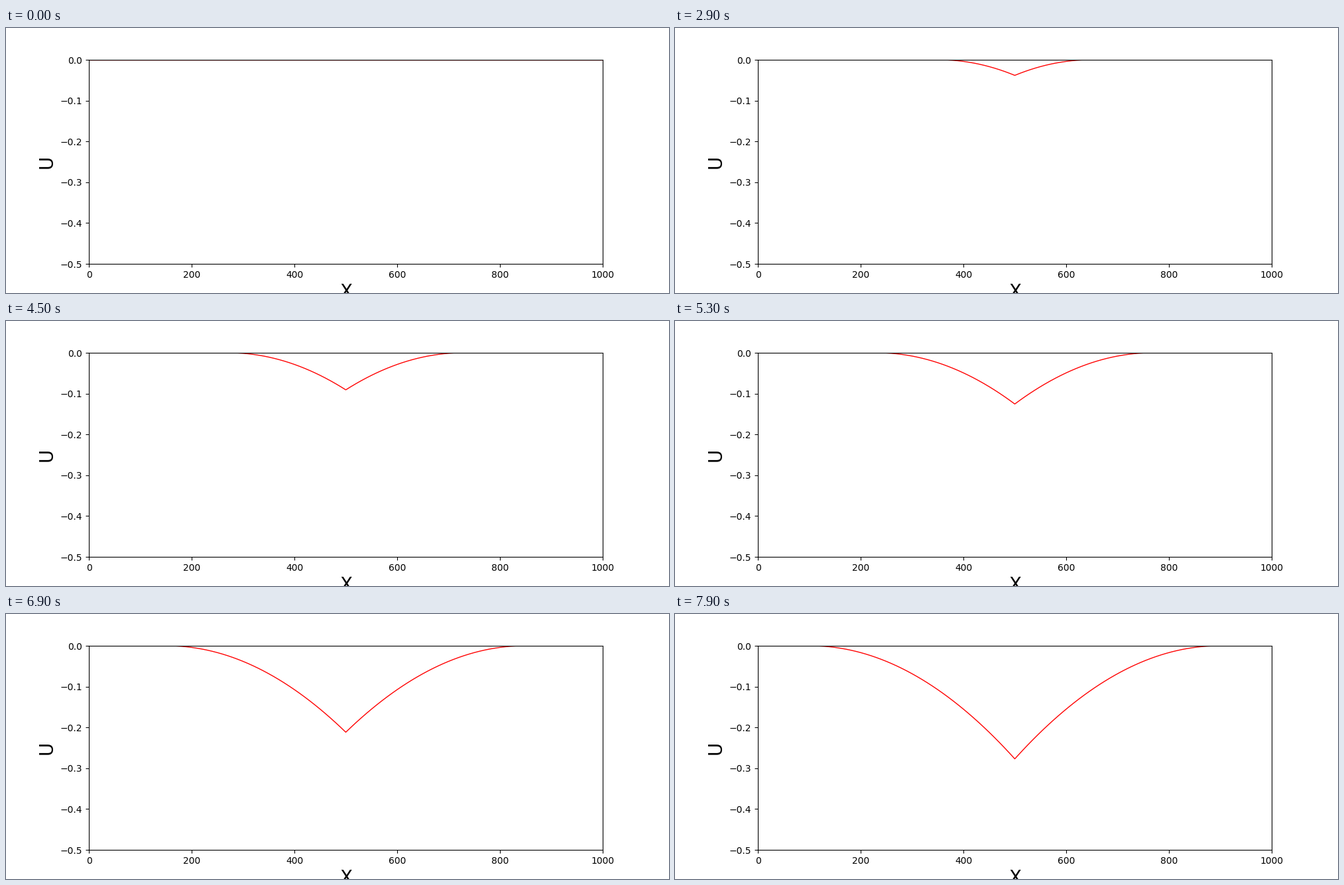
A matplotlib script for the animation above (8000 ms loop, 1000x400 px).

```python
import numpy as np
import matplotlib.pyplot as plt
from matplotlib.animation import FuncAnimation

FRAMES = 80
INTERVAL = 100      # ms
DX = 5              # the wave front advances one cell per step
CENTER = 500
AMP = 4.384e-5

x = np.arange(0, 1000 + DX, DX)
cells = np.abs(x - CENTER) // DX


def displacement(step):
    """String pulled down at its centre by a steadily growing point load."""
    m = np.clip(step - cells, 0, None)
    return -AMP * m * (m + 1)


plt.rcParams["font.family"] = "DejaVu Sans"
fig, ax = plt.subplots(figsize=(10, 4), dpi=100)
ax.set_xlim(0, 1000)
ax.set_ylim(-0.5, 0)
ax.set_xlabel("X", fontsize=20)
ax.set_ylabel("U", fontsize=20)
line, = ax.plot(x, displacement(0), color="red", lw=1)


def update(step):
    line.set_ydata(displacement(step))
    return line,


anim = FuncAnimation(fig, update, frames=FRAMES, interval=INTERVAL,
                     repeat=True, repeat_delay=0)
plt.show()
```
